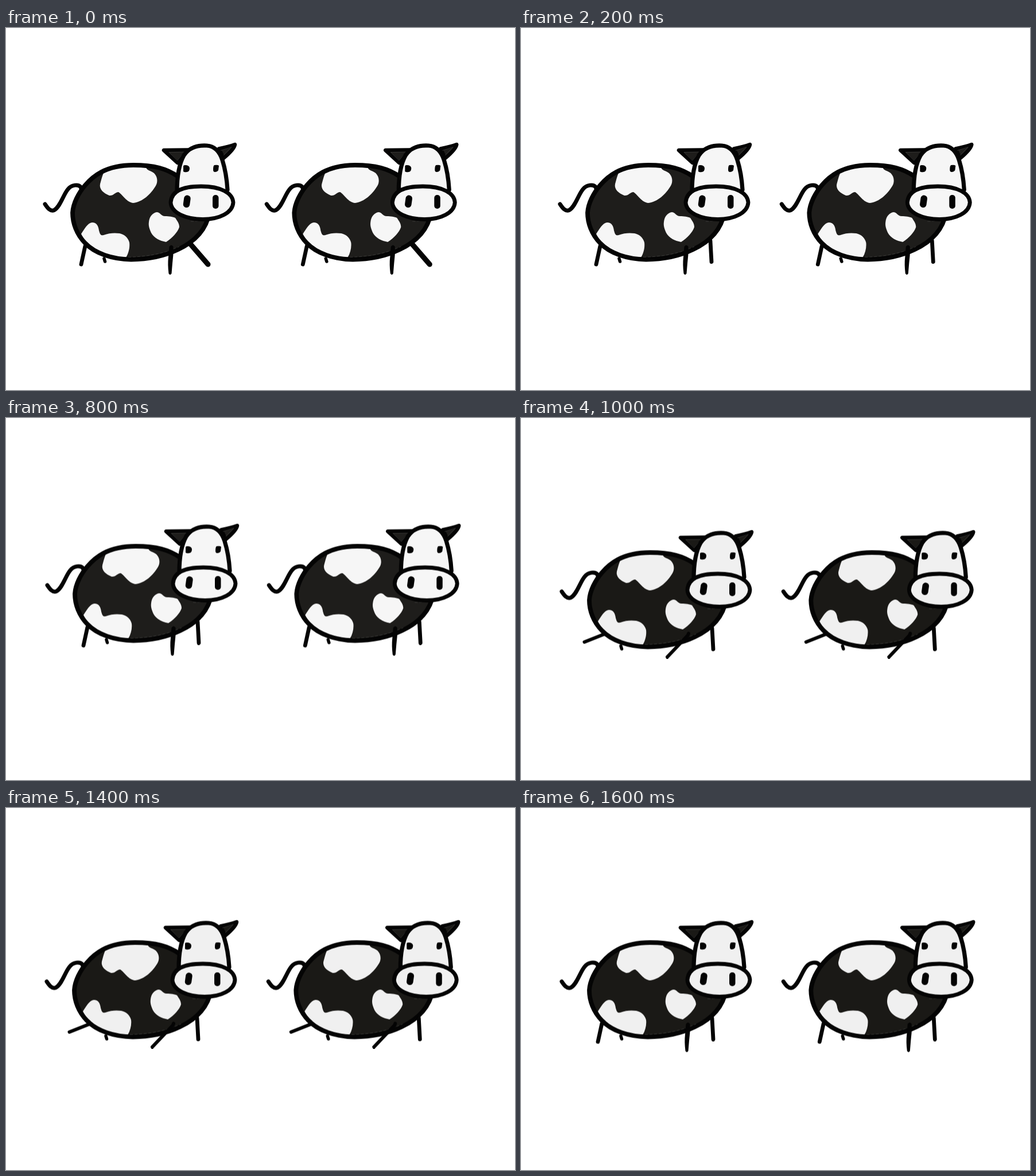
An HTML page for the animation above (1800 ms loop, 887x631 px).

```html
<!DOCTYPE html>
<html lang="en">
<head>
<meta charset="utf-8">
<title>Dancing cows</title>
<style>
  html, body { margin: 0; width: 100%; height: 100%; overflow: hidden; background: #fff; }
  svg { display: block; }
  .line { stroke: #040404; stroke-linecap: round; stroke-linejoin: round; }
  .open { fill: none; }
  .dark { fill: currentColor; }
  .ink { fill: #040404; }
  .gap { fill: none; stroke: #4a4a48; stroke-width: .6; }

  .herd, .front-kick, .front-stand, .back-kick, .back-stand { animation: 1800ms step-end infinite; }
  .herd { animation-name: bob; }
  .front-kick { animation-name: front-kick; }
  .front-stand { animation-name: front-stand; }
  .back-kick { animation-name: back-kick; }
  .back-stand { animation-name: back-stand; }

  @keyframes bob {
    0% { transform: translate(0, 0); fill: #f6f6f6; color: #1e1d1b; }
    44.444% { transform: translate(4px, -15.5px); fill: #f6f6f6; color: #1e1d1b; }
    55.555%, 100% { transform: translate(3px, -4.5px); fill: #f0f0f0; color: #1a1916; }
  }
  @keyframes front-kick {
    0%, 22.222% { visibility: visible; }
    11.111%, 33.333%, 100% { visibility: hidden; }
  }
  @keyframes front-stand {
    0%, 22.222% { visibility: hidden; }
    11.111%, 33.333%, 100% { visibility: visible; }
  }
  @keyframes back-kick {
    55.555%, 77.777% { visibility: visible; }
    0%, 66.666%, 88.888%, 100% { visibility: hidden; }
  }
  @keyframes back-stand {
    55.555%, 77.777% { visibility: hidden; }
    0%, 66.666%, 88.888%, 100% { visibility: visible; }
  }
</style>
</head>
<body>
<svg width="887" height="631" viewBox="0 0 887 631">
  <defs>
    <path id="outline" d="M116 322C117 306 126 288 138 274C150 260 172 239 222 239C258 239 280 245 300 259C325 275 352 300 354 322C350 350 330 372 300 386C275 398 250 403.500 218 403.500C185 403 155 393 138 375C123 360 116 340 116 322Z"/>

    <g id="cow">
      <path class="line open" stroke-width="7" d="M68 307C72 313 77 320.500 84 317.500C95 311 100 290 108 281C114 273 126 272 130 277L132 283"/>
      <path class="line open" stroke-width="5.500" d="M171 402L172.500 407"/>

      <use href="#outline" class="dark"/>
      <path d="M171 251C180 245 200 242 222 242L244 243C246 249 252 248 258 253C264 259 265 268 261 275C252 290 238 303 222 305C210 304 204 291 196 286C190 286 187 293 180 292C170 288 162 281 164 272C166 265 168 256 171 251Z"/>
      <path d="M249 338C250 328 256 322 263 321C270 322 270 328 277 328C284 328 291 329 295 331C298 336 302 340 302 347C299 356 290 366 279 373C268 371 258 366 253 357C250 350 248 345 249 338Z"/>
      <path d="M131 359C137 350 142 340 150 339C158 339 161 345 162 353C164 360 165 362 170 361C180 357 190 357 198 358C207 360 213 366 215 374C216 382 214 392 209 400C190 400 170 395 155 386C143 377 136 369 131 359Z"/>
      <use href="#outline" class="line open" stroke-width="7.800"/>
      <path class="gap" stroke-dasharray="5 3" d="M213 399.500C250 398 275 393 302 381M322 337C333 338 343 335 350 331"/>

      <path class="line dark" stroke-width="6.500" d="M275 213L317 212.500L299 235Z"/>
      <path class="line dark" stroke-width="6.500" d="M371 210.500Q388 207 399 203Q398 211 379 227Z"/>
      <path class="gap" d="M284 216.500L311 216L298.500 231ZM374 213.500L393 207.500L379 222"/>

      <path class="line" stroke-width="7.200" d="M298 285C298 262 301 238 310 222C319 208 335 204 350 205C364 206 372 215 377 230C382 246 385 265 386 282"/>
      <path class="line" stroke-width="6.800" d="M287 304C288 287 302 276 340 276C375 276 395 288 396 304C395 322 372 333.500 343 333.500C315 333.500 288 323 287 304Z"/>

      <g class="ink">
        <path d="M309 241Q309 239 312 239Q319 239 320 244Q320 251 315 251Q308 252 309 248Z"/>
        <path d="M363 239Q369 238 371 240L370 248Q368 251 364 251Q361 251 361 247Q361 240 363 239Z"/>
        <rect x="309.500" y="291.500" width="11.500" height="21.500" rx="5.500" transform="rotate(8 315 302)"/>
        <rect x="360" y="291" width="10.500" height="24" rx="5"/>
      </g>
    </g>

    <path id="fore" class="ink" d="M284.500 381Q288 376 291.500 381Q292 396 290 410L288.500 428Q286 432 283.500 428Q281.500 412 283 399Z"/>
    <path id="fore-kick" class="line open" stroke-width="6" d="M289 380L288 383L252 421"/>
    <path id="hind" class="line open" stroke-width="6.800" d="M138 380L131 412"/>
    <path id="hind-kick" class="line open" stroke-width="6" d="M144 380.500L107.500 395"/>
    <path id="far" class="line open" stroke-width="6.800" d="M330 371L332 407.500"/>
    <path id="far-kick" class="line open" stroke-width="9" d="M320 375L352 412"/>
  </defs>

  <g class="herd">
    <use href="#cow"/><use href="#cow" x="386.300"/>
    <g class="front-kick">
      <use href="#far-kick"/><use href="#far-kick" x="386.300"/>
    </g>
    <g class="front-stand">
      <use href="#far"/><use href="#far" x="386.300"/>
    </g>
    <g class="back-kick">
      <use href="#fore-kick"/><use href="#fore-kick" x="386.300"/>
      <use href="#hind-kick"/><use href="#hind-kick" x="386.300"/>
    </g>
    <g class="back-stand">
      <use href="#fore"/><use href="#fore" x="386.300"/>
      <use href="#hind"/><use href="#hind" x="386.300"/>
    </g>
  </g>
</svg>
</body>
</html>
```
